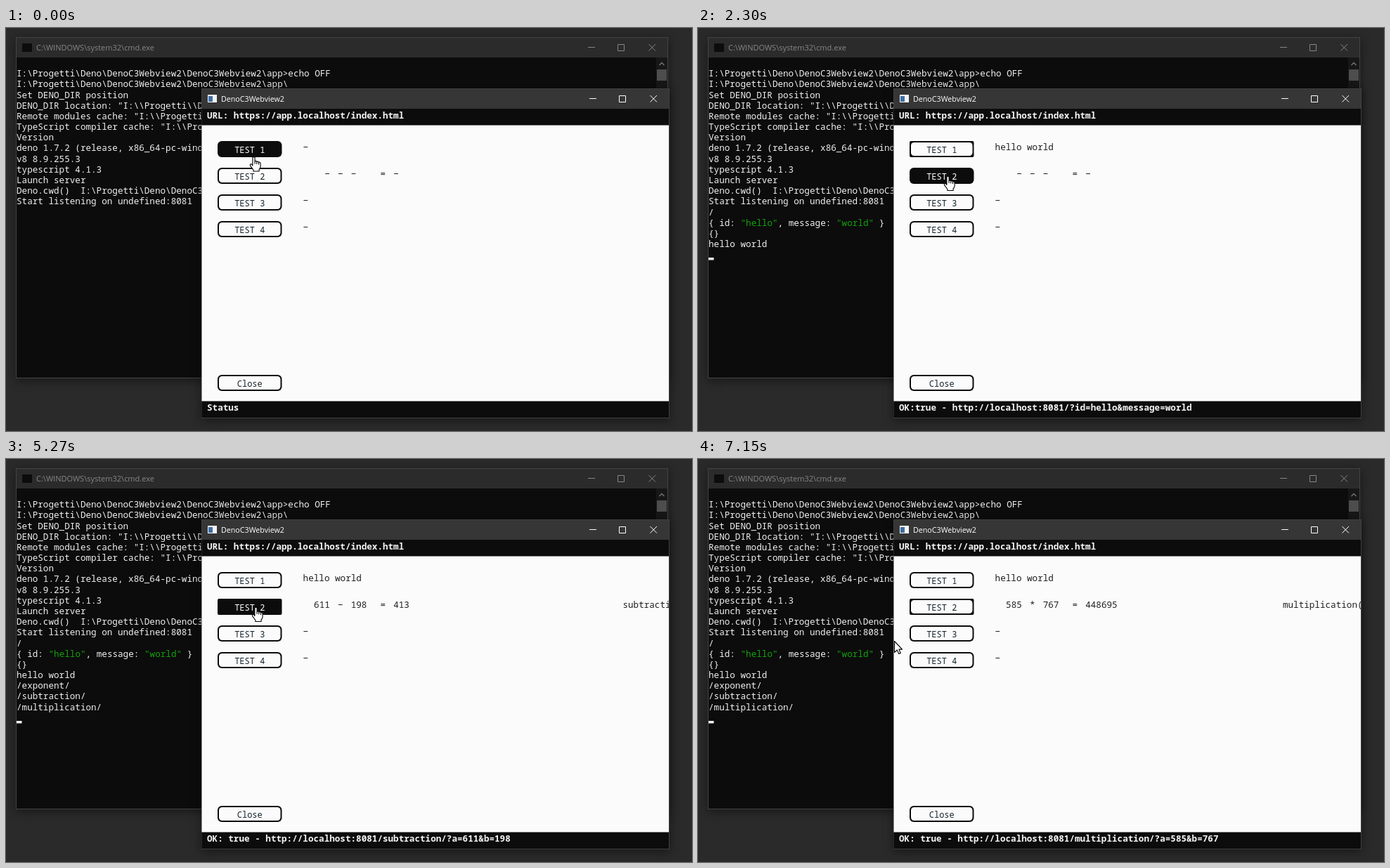
An HTML page with a canvas that plays this animation: 976x574 px, repeating every 7.99 s.

```html
<!DOCTYPE html>
<html lang="en">
<head>
<meta charset="utf-8">
<title>Webview test</title>
<style>
html, body { margin: 0; width: 100%; height: 100%; overflow: hidden; background: #2a2a2a; }
canvas { display: block; }
</style>
</head>
<body>
<canvas id="stage" width="976" height="574"></canvas>
<script>
const ctx = document.getElementById('stage').getContext('2d');
const LOOP = 7990;
const MONO = '"Noto Sans Mono", "DejaVu Sans Mono", monospace';
const SANS = '"Open Sans", "Noto Sans", sans-serif';
const BLACK = '#0c0c0c', PAPER = '#fbfbfb', CHAR = 7.584, LINE = 15.17;
const DASH = '\u2212';

const intro = [
  'I:\\Progetti\\Deno\\DenoC3Webview2\\DenoC3Webview2\\app>echo OFF',
  'I:\\Progetti\\Deno\\DenoC3Webview2\\DenoC3Webview2\\app\\',
  'Set DENO_DIR position',
  'DENO_DIR location: "I:\\\\Progetti\\\\Deno',
  'Remote modules cache: "I:\\\\Progetti\\\\Deno',
  'TypeScript compiler cache: "I:\\\\Progetti',
  'Version',
  'deno 1.7.2 (release, x86_64-pc-windows-msvc)',
  'v8 8.9.255.3',
  'typescript 4.1.3',
  'Launch server',
  'Deno.cwd()  I:\\Progetti\\Deno\\DenoC3Webview2',
  'Start listening on undefined:8081'
];

// Console output: [time, line]
const output = [
  [1140, '/'],
  [1140, '{ id: "hello", message: "world" }'],
  [1140, '{}'],
  [1140, 'hello world'],
  [2840, '/exponent/'],
  [4130, '/subtraction/'],
  [5270, '/multiplication/']
];

const HOST = 'http://localhost:8081/';
const HELLO = HOST + '?id=hello&message=world';
const statuses = [
  [0, 'Status'],
  [840, 'Waiting for response from: ' + HELLO],
  [1220, 'OK:true - ' + HELLO]
];

// Calculations: [time, name, a, operator, b, result]
const sums = [
  [0, '', DASH, DASH, DASH, DASH],
  [2920, 'exponent', '742', '^', '519', 'Infinity'],
  [4130, 'subtraction', '611', DASH, '198', '413'],
  [5350, 'multiplication', '585', '*', '767', '448695']
];
for (const [time, name, a, , b] of sums.slice(1))
  statuses.push([time, `OK: true - ${HOST}${name}/?a=${a}&b=${b}`]);

// Pointer tip: [time, x, y]
const pointer = [
  [0, 352.5, 183.5], [1980, 353, 185], [2060, 353, 190], [2140, 354, 197],
  [2220, 355, 206], [2300, 355.5, 211],
  [5500, 620, 234], [5580, 859.5, 257.5], [5660, 932, 262], [5810, 938, 262],
  [6190, 868, 262], [6270, 690, 262], [6350, 480, 261], [6430, 368, 259],
  [6510, 335.5, 258], [6590, 324, 258], [6670, 314, 258], [6750, 305, 259],
  [6830, 296, 260], [6910, 287, 259.5], [6990, 284, 259.5],
  [7070, 281, 259.5], [7150, 279.5, 259.5]
];

const focus = [[0, -1], [760, 0], [2760, 1]];

const buttons = ['TEST 1', 'TEST 2', 'TEST 3', 'TEST 4', 'Close'].map((label, i) => ({
  label, x: 301, y: i < 4 ? 161 + i * 38 : 494, w: 91.5, h: 23
}));

const latest = (list, t) => list.filter(item => item[0] <= t).pop();
const inside = (b, x, y) => x >= b.x && x <= b.x + b.w && y >= b.y && y <= b.y + b.h;

function rect(x, y, w, h, color) {
  ctx.fillStyle = color;
  ctx.fillRect(x, y, w, h);
}

function round(x, y, w, h, r, color) {
  ctx.fillStyle = color;
  ctx.beginPath();
  ctx.roundRect(x, y, w, h, r);
  ctx.fill();
}

function frame(x, y, w, h, color) {
  ctx.save();
  ctx.shadowColor = 'rgba(0, 0, 0, 0.45)';
  ctx.shadowBlur = 14;
  ctx.shadowOffsetY = 3;
  rect(x, y, w, h, color);
  ctx.restore();
}

function text(str, x, y, color, { size = 12.64, weight = 400, family = MONO, align = 'left' } = {}) {
  ctx.font = `${weight} ${size}px ${family}`;
  ctx.textAlign = align;
  ctx.fillStyle = color;
  ctx.fillText(str, x, y);
}

function controls(x, y, color) {
  ctx.strokeStyle = color;
  ctx.lineWidth = 1;
  ctx.beginPath();
  ctx.moveTo(x, y - 0.5);
  ctx.lineTo(x + 10, y - 0.5);
  ctx.rect(x + 42.5, y - 4.5, 9, 9);
  ctx.moveTo(x + 86.5, y - 5);
  ctx.lineTo(x + 96, y + 4.5);
  ctx.moveTo(x + 96, y - 5);
  ctx.lineTo(x + 86.5, y + 4.5);
  ctx.stroke();
}

function consoleLine(str, row) {
  const y = 69.3 + row * LINE;
  let x = 15;
  for (const part of str.split(/("[a-z]+")/)) {
    text(part, x, y, /^"[a-z]+"$/.test(part) ? '#13a10e' : '#f0f0f0');
    x += part.length * CHAR;
  }
}

function drawConsole(t) {
  frame(14, 13, 928, 486, '#444');
  rect(15, 14, 926, 28, '#2b2b2b');
  rect(15, 42, 926, 456, BLACK);
  rect(23, 22, 14, 12, BLACK);
  text('C:\\WINDOWS\\system32\\cmd.exe', 43, 32, '#868686', { size: 11, family: SANS });
  controls(828, 28, '#858585');

  rect(925, 42, 16, 456, '#171717');
  rect(926, 59, 14, 16, '#4d4d4d');
  ctx.strokeStyle = '#777';
  ctx.lineWidth = 1.3;
  ctx.beginPath();
  ctx.moveTo(929.5, 53);
  ctx.lineTo(933, 49.5);
  ctx.lineTo(936.5, 53);
  ctx.stroke();

  const lines = intro.concat(output.filter(o => o[0] <= t).map(o => o[1]));
  lines.forEach(consoleLine);
  if (lines.length > intro.length)
    rect(15, Math.round(69.3 + lines.length * LINE), 7.5, 3.5, '#f2f2f2');
}

function drawButton(b, hover, focused) {
  round(b.x, b.y, b.w, b.h, focused ? 2 : 6, BLACK);
  if (!hover) round(b.x + 2, b.y + 2, b.w - 4, b.h - 4, 4.5, PAPER);
  text(b.label, b.x + b.w / 2, b.y + 16.5, hover ? '#fff' : '#16242e',
    { size: 12, weight: hover ? 500 : 400, align: 'center' });
}

function drawApp(t, px, py) {
  frame(278, 86, 666, 470, '#404040');
  rect(279, 87, 664, 28, '#363636');
  rect(278.5, 115, 664.5, 440, BLACK);
  rect(278.5, 138.5, 664.5, 393, PAPER);
  rect(287, 95, 13, 11, '#f4f4f4');
  rect(288, 97, 6, 8, '#3f6ea5');
  text('DenoC3Webview2', 306, 104.8, '#fff', { size: 10.7, family: SANS });
  controls(830, 101, '#fff');
  text('URL: https://app.localhost/index.html', 286, 128.6, '#f5f5f5', { weight: 700 });
  text(latest(statuses, t)[1], 286, 545, '#f5f5f5', { weight: 700 });

  const active = latest(focus, t)[1];
  buttons.forEach((b, i) => drawButton(b, inside(b, px, py), i === active));

  const ink = '#202020', thin = { weight: 300 };
  const rowY = i => 173.8 + i * 37.95;
  text(t < 1220 ? DASH : 'hello world', 422.6, rowY(0), ink, thin);
  text(DASH, 422.6, rowY(2), ink, thin);
  text(DASH, 422.6, rowY(3), ink, thin);

  const [, name, a, op, b, result] = latest(sums, t);
  const y = rowY(1);
  text(a, 460.8, y, ink, { weight: 300, align: 'right' });
  text(op, 472, y, ink, thin);
  text(b, 490.7, y, ink, thin);
  text('=', 532.4, y, ink, thin);
  text(result, 551.2, y, ink, thin);
  if (name) {
    ctx.save();
    ctx.beginPath();
    ctx.rect(279, 139, 664, 393);
    ctx.clip();
    text(`${name}(${a},${b})`, 983.6 - (name.length + result.length) * CHAR, y, ink, thin);
    ctx.restore();
  }
}

const arrow = new Path2D('M0 0V16L3.8 12.5 6.3 18 8.8 17 6.4 11.6H11Z');
const hand = new Path2D('M-1.6 1Q0 -.8 1.6 1V6.3Q3.2 5.3 4.3 7Q6 6 7 7.7Q9.2 7.2 9.6 9.5V14' +
  'Q9.5 16 7.6 18V20.5H-.6V18.5L-5 12.6Q-5.5 9.8 -3.4 10.4L-1.6 12.3Z');
const joints = new Path2D('M1.6 6V10M4.3 7V10.5M7 7.7V11');

function drawPointer(x, y) {
  const over = buttons.some(b => inside(b, x, y));
  const shape = over ? hand : arrow;
  ctx.save();
  ctx.translate(x, y);
  ctx.fillStyle = '#fff';
  ctx.strokeStyle = '#000';
  ctx.lineWidth = 1.1;
  ctx.lineJoin = 'round';
  ctx.fill(shape);
  ctx.stroke(shape);
  if (over) ctx.stroke(joints);
  ctx.restore();
}

function draw(t) {
  const [, x, y] = latest(pointer, t);
  rect(0, 0, 976, 574, '#2a2a2a');
  drawConsole(t);
  drawApp(t, x, y);
  drawPointer(x, y);
}

const start = performance.now();
function tick() {
  draw((performance.now() - start) % LOOP);
  requestAnimationFrame(tick);
}
tick();
</script>
</body>
</html>
```
